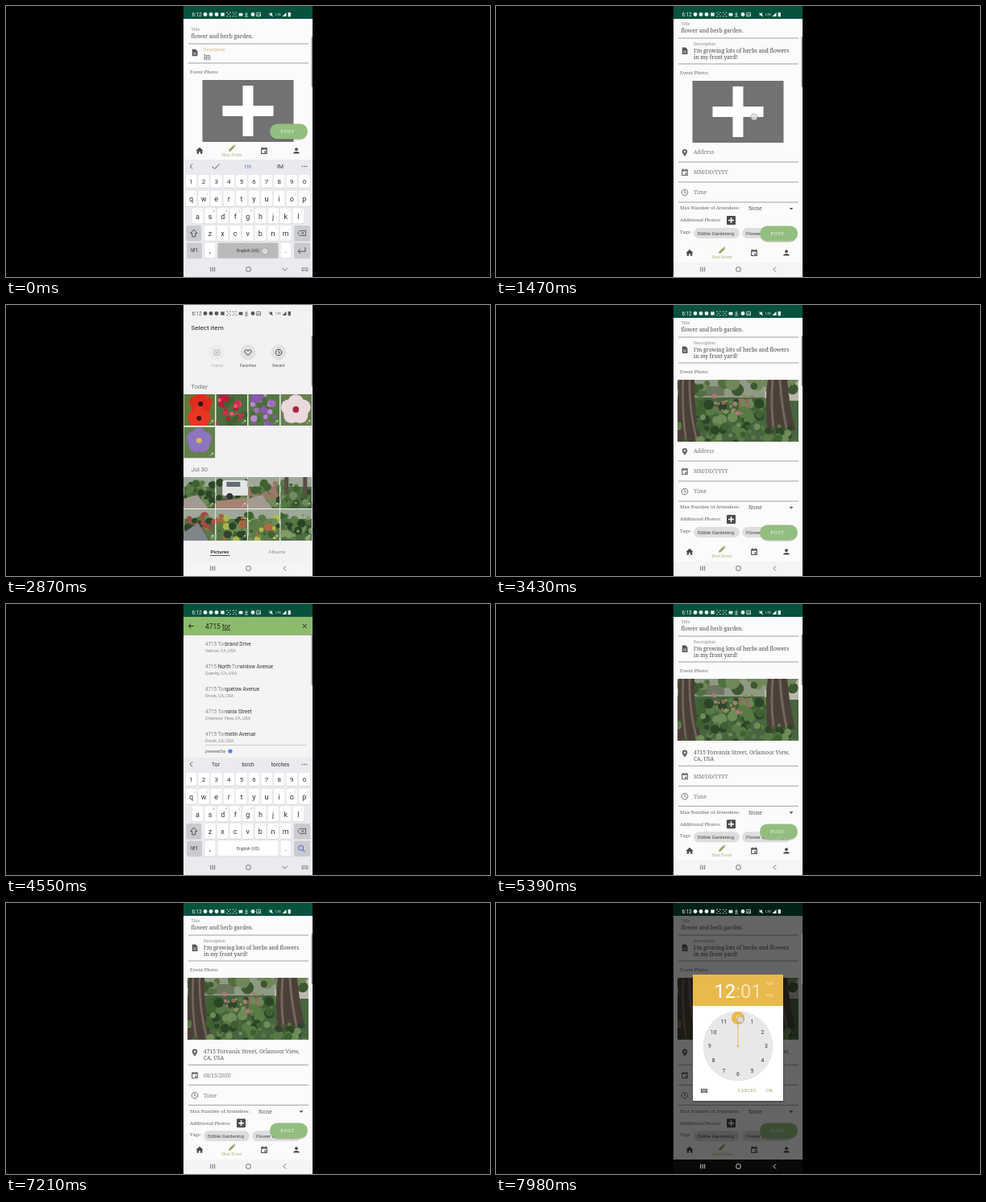
These frames come from a looping animation (600x337 px, 8000 ms). An HTML page:

```html
<!DOCTYPE html>
<html lang="en">
<head>
<meta charset="utf-8">
<title>Garden event form</title>
<style>
html, body { margin: 0; width: 100%; height: 100%; overflow: hidden; background: #000; }
svg { display: block; }
text { font-family: "Noto Serif", serif; white-space: pre; }
.r { font-family: Roboto, sans-serif; }
.m { text-anchor: middle; }
.b { font-weight: 500; }
.u { text-decoration: underline; }
</style>
</head>
<body>
<svg id="stage" width="100%" height="100%" viewBox="0 0 600 337"></svg>
<script>
const $ = id => document.getElementById(id);
const rect = (x, y, w, h, fill, r = 0, more = '') =>
  `<rect x="${x}" y="${y}" width="${w}" height="${h}" rx="${r}" fill="${fill}" ${more}/>`;
const disc = (x, y, r, fill, more = '') => `<circle cx="${x}" cy="${y}" r="${r}" fill="${fill}" ${more}/>`;
const path = (d, stroke, w = 0.9, fill = 'none') =>
  `<path d="${d}" stroke="${stroke}" stroke-width="${w}" fill="${fill}"/>`;
const shape = (d, fill) => `<path d="${d}" fill="${fill}"/>`;
// y is the optical middle of the line
const text = (x, y, size, str, fill = '#666', cls = '', more = '') =>
  `<text x="${x}" y="${y + size * 0.34}" font-size="${size}" fill="${fill}" class="${cls}" ${more}>${str}</text>`;
const group = (id, inner, more = '') => `<g id="${id}" ${more}>${inner}</g>`;
const at = (x, y, inner) => `<g transform="translate(${x} ${y})">${inner}</g>`;
const pic = (x, y, w, h, inner) =>
  `<svg x="${x}" y="${y}" width="${w}" height="${h}" viewBox="0 0 ${w} ${h}" preserveAspectRatio="none">${inner}</svg>`;
const line = (y, x = 226, x2 = 375) => path(`M${x} ${y}H${x2}`, '#8a8a8a', 0.8);

function seeded(s) {
  return () => (s = (s * 16807) % 2147483647) / 2147483647;
}

function blobs(seed, n, x, y, w, h, size, colors) {
  const rnd = seeded(seed * 7919);
  let out = '';
  for (let i = 0; i < n; i++) {
    out += disc((x + rnd() * w).toFixed(1), (y + rnd() * h).toFixed(1),
      (size * (0.5 + rnd())).toFixed(1), colors[Math.floor(rnd() * colors.length)]);
  }
  return out;
}

const leaf = ['#3f6132', '#587a45', '#2c4527', '#6d8c58'];

// icons, drawn around their centre
const home = c => shape('M0 -4.3L4.6 0H3.3V3.7H1V1H-1V3.7H-3.3V0H-4.6Z', c);
const pencil = c => shape('M-3.7 3.7V1.8L1.6 -3.5L3.5 -1.6L-1.8 3.7ZM2.1 -4L2.9 -4.7L4.7 -2.9L4 -2.1Z', c);
const calendar = c => path('M-3.3 -3H3.3V3.5H-3.3ZM-2 -4.4V-2.5M2 -4.4V-2.5M-3.3 -2H3.3', c, 1.1) + rect(0.3, 0.5, 2, 2, c);
const person = c => disc(0, -1.8, 1.9, c) + shape('M-3.7 3.5V2.4Q-3 1 0 0.9Q3 1 3.7 2.4V3.5Z', c);
const pin = c => `<path fill-rule="evenodd" fill="${c}" d="M0 4.5Q-3.2 .7 -3.2 -1.4A3.2 3.2 0 0 1 3.2 -1.4Q3.2 .7 0 4.5ZM0 -2.6A1.2 1.2 0 0 0 0 -.2A1.2 1.2 0 0 0 0 -2.6Z"/>`;
const clock = c => path('M0 -3.8A3.8 3.8 0 1 1 -.01 -3.8ZM0 -2.3V.2L1.8 1.3', c, 0.9);
const doc = c => shape('M-3.2 -4.2H1L3.4 -1.8V4.2H-3.2Z', c) + path('M-1.8 .3H1.8M-1.8 2.2H1.8', '#fff', 0.7);
const keypad = c => rect(-4, -2.6, 8, 5.2, c, 0.7) + path('M-3 -1.1H3M-3 .3H3', '#eee', 0.7, 'none') + path('M-1.6 1.7H1.6', '#eee', 0.7);

function photo() {
  const bark = ['#4b4038', '#75675c', '#5b4d44'];
  return pic(225, 93, 150, 77,
    rect(0, 0, 150, 77, '#486440') + rect(0, 0, 150, 22, '#8f9a85') + rect(108, 2, 42, 24, '#b9b8ac')
    + rect(28, 8, 30, 12, '#6d7560') + blobs(3, 26, 0, 0, 150, 14, 6, ['#52703f', '#70875a', '#3d5733'])
    + rect(101, 27, 10, 8, '#d4d3ce') + blobs(4, 80, 20, 24, 100, 50, 5, leaf)
    + blobs(9, 24, 40, 16, 54, 26, 2, ['#a77a78', '#936862', '#7f965f'])
    + shape('M2 0H21Q20 40 30 77H0V30Z', bark[0]) + path('M7 0Q5 40 11 77M15 0Q14 38 24 75', bark[1], 2.5)
    + shape('M112 0H136Q139 35 146 62L112 68Q108 25 112 0Z', bark[0])
    + path('M118 0Q115 35 120 66M127 0Q129 34 136 64', bark[1], 3)
    + blobs(13, 38, 0, 56, 150, 22, 4, leaf));
}

function form() {
  const ico = '#666';
  const chip = (x, w, s) => rect(x, 276, w, 13, '#dedede', 6.5) + text(x + 5, 282.5, 6, s, '#444', 'r');
  const plus = group('plus', rect(243.5, 93, 113, 77, '#727275') + rect(293.5, 100, 13, 63, '#fff') + rect(268.5, 125, 63, 13, '#fff'));
  const lower = group('lower',
    at(234, 207, calendar(ico)) + text(245, 207, 6.67, 'MM/DD/YYYY', '#777', '', 'id="dateText"') + line(219)
    + at(234, 232, clock(ico)) + text(245, 232, 6.67, 'Time', '#777') + line(244)
    + text(228, 251.5, 5.8, 'Max Number of Attendees:') + text(313, 252, 6.67, 'None', '#555') + shape('M363.5 251H368.5L366 253.6Z', '#555')
    + text(228, 266.5, 5.8, 'Additional Photos:') + rect(286, 261, 11, 11, '#4c4c4c', 1) + path('M291.5 263V270M288 266.5H295', '#fff', 1.5)
    + text(228, 281, 5.8, 'Tags:') + chip(245, 57, 'Edible Gardening') + chip(305, 60, 'Flower Gardening'));
  const middle = group('middle', text(228, 83, 5.9, 'Event Photo:') + plus + group('shot', photo())
    + at(234, 182.5, group('pin', pin(ico))) + text(245, 182, 6.67, 'Address', '#777', '', 'id="addr1"')
    + text(245, 193, 6.67, '', '#555', '', 'id="addr2"') + group('addrLine', line(194)) + lower);
  const content = group('content',
    text(229.5, 22.5, 5, 'Title', '#888') + text(229.5, 30.5, 6.67, 'flower and herb garden.', '#4c4c4c') + line(40)
    + at(234, 51, group('docIcon', doc('#555'))) + text(245, 47, 4.95, 'Description', '#888', '', 'id="descLabel"')
    + text(245, 55.5, 6.67, '', '#444', '', 'id="desc1"') + text(245, 63.5, 6.67, '', '#444', '', 'id="desc2"')
    + group('descLine', line(72)) + middle);
  const tabs = group('tabs', rect(220, 297, 160, 60, '#fbfbfb')
    + at(240, 307, home('#4b4b4b')) + at(280, 304, pencil('#94a46c')) + text(280, 312.5, 4.9, 'Host Event', '#9db56f', 'm')
    + at(320, 307, calendar('#4b4b4b')) + at(360, 307, person('#4b4b4b'))
    + rect(327.5, 275, 46, 19, '#000', 9.5, 'opacity=".16"') + rect(327, 273.5, 47, 19, '#93be7f', 9.5)
    + text(349, 283, 6, 'POST', '#f3f8ef', 'm', 'letter-spacing=".6"'));
  return rect(220, 0, 160, 337, '#fbfbfb') + content + rect(220, 0, 160, 16, '#07523f') + tabs;
}

function gallery() {
  const thumb = (col, y, bg, inner) => pic(220.3 + col * 40, y, 39, 39, rect(0, 0, 39, 39, bg) + inner
    + path('M32.5 36.5L36.5 32.5M34.5 32.5H36.5V34.5', '#eee', 0.7));
  const petals = (x, y, r, c, core) => [0, 1, 2, 3, 4].map(i =>
    disc(x + Math.sin(i * 1.257) * r * 0.7, y - Math.cos(i * 1.257) * r * 0.7, r * 0.75, c)).join('') + disc(x, y, r * 0.3, core);
  const garden = (seed, extra = [], tail = '') => rect(0, 0, 39, 12, '#9ea899')
    + blobs(seed, 34, 0, 7, 39, 32, 3.6, leaf.concat(extra)) + tail;
  const round = (x, label, icon, o) => `<g opacity="${o}">` + disc(x, 59, 9.7, '#e2e2e5')
    + at(x, 59, icon) + text(x, 75, 5, label, '#555', 'r m') + '</g>';
  const path1 = shape('M0 39V27L17 22L30 39Z', '#a39b91');
  const thumbs = group('thumbs',
    thumb(0, 111, '#5f7a3b', petals(21, 12, 10, '#df2b1d', '#30151a') + petals(19, 30, 10, '#e93522', '#3a1719'))
    + thumb(1, 111, '#4c6d3d', blobs(21, 26, 0, 0, 39, 39, 3.6, ['#d62b4f', '#b91c3c', '#e85573', '#3f6132']))
    + thumb(2, 111, '#557843', blobs(22, 34, 5, 0, 28, 39, 3, ['#a06ec0', '#8a58ad', '#b98ad0', '#486d3b']))
    + thumb(3, 111, '#68804f', petals(19, 19, 13, '#ead9dc', '#a9243f'))
    + thumb(0, 151.5, '#64804c', petals(19, 17, 11, '#8d75c0', '#e2ba4e'))
    + thumb(0, 214, '#48653f', garden(31, [], path1))
    + thumb(1, 214, '#6d765f', garden(32) + rect(8, 4, 31, 19, '#e4e5e6', 2) + rect(13, 6, 17, 6, '#646d73') + disc(17, 24, 4, '#333') + shape('M0 39V30L39 26V39Z', '#a68375'))
    + thumb(2, 214, '#516a46', garden(33, ['#997868'], path1))
    + thumb(3, 214, '#506a48', garden(34) + rect(5, 0, 5, 21, '#5a4c43') + rect(28, 0, 5, 21, '#5a4c43'))
    + thumb(0, 254, '#596a47', garden(35, ['#a64a45']) + shape('M0 39V29L18 17L31 39Z', '#80858a'))
    + thumb(1, 254, '#58764a', garden(36, ['#a86643', '#a6b849']))
    + thumb(2, 254, '#5b7b48', garden(37, ['#aa6b47', '#b1bb4e']))
    + thumb(3, 254, '#4d6c43', garden(38, ['#7f9b61'])));
  return rect(220, 0, 160, 337, '#f2f2f4') + text(229.5, 28, 8.1, 'Select item', '#222', 'r')
    + round(261.5, 'Videos', path('M-3 -3H3V3H-3Z', '#444', 0.8) + shape('M-1 -1.5L1.6 0L-1 1.5Z', '#444'), 0.4)
    + round(300, 'Favorites', path('M0 3.4Q-6.5 -1 -2.7 -3.2Q-.8 -3.7 0 -1.7Q.8 -3.7 2.7 -3.2Q6.5 -1 0 3.4Z', '#333', 0.9), 1)
    + round(338, 'Recent', clock('#333'), 1)
    + text(229.5, 101.5, 7.6, 'Today', '#777', 'r') + text(229.5, 204, 7.6, 'Jul 30', '#777', 'r') + thumbs
    + rect(220, 295, 160, 42, '#f2f2f4') + text(265, 307, 6.2, 'Pictures', '#222', 'r m b') + path('M253 311.5H277.5', '#333', 0.8)
    + text(336, 307, 6.2, 'Albums', '#888', 'r m');
}

const street = '4715 Torvanix Street';
const places = [
  ['4715 Torbrand Drive', 'Velmar, CA, USA'],
  ['4715 North Torwinlow Avenue', 'Quenby, CA, USA'],
  ['4715 Torquelow Avenue', 'Drosk, CA, USA'],
  [street, 'Orlamoor View, CA, USA'],
  ['4715 Tormelin Avenue', 'Drosk, CA, USA']
];

function search() {
  const rows = places.map((p, i) => text(247, 49.5 + 28 * i, 6.3, '', '#333', 'r', `id="place${i}"`)
    + text(247, 58.5 + 28 * i, 5.3, '', '#888', 'r', `id="town${i}"`)).join('');
  return rect(220, 0, 160, 337, '#f4f4f4') + rect(220, 16, 160, 23, '#8dbb6c') + rect(220, 0, 160, 16, '#07523f')
    + path('M232.5 27.5H226.7M229.3 24.7L226.5 27.5L229.3 30.3', '#222', 1) + text(247, 28, 8.4, '', '#222', 'r', 'id="query"')
    + path('M367.7 25L372.7 30M372.7 25L367.7 30', '#222', 1)
    + group('results', rows + path('M247 175.5H373', '#bbb', 0.7) + text(247, 183, 4.9, 'powered by', '#555', 'r') + disc(278, 183, 2.6, '#4a83e8'));
}

const keyBox = {};
function keyboard() {
  let out = rect(220, 191, 160, 146, '#e9ebee');
  const key = (c, x, y, w, h, fill = '#fff') => {
    keyBox[c] = [x - w / 2, y - h / 2, w, h];
    return rect(x - w / 2, y - h / 2 + 0.7, w, h, '#cfd1d5', 2) + rect(x - w / 2, y - h / 2, w, h, fill, 2);
  };
  const rows = [['1234567890', 229.5, 218, 16, ''], ['qwertyuiop', 229.5, 239.5, 19, '+×÷=/_‹›[]'],
    ['asdfghjkl', 237.5, 261, 19, '!@#$%^~*('], ['zxcvbnm', 253, 282.5, 19, "-':;,?~"]];
  for (const [chars, x0, y, h, hints] of rows) {
    [...chars].forEach((c, i) => {
      const x = x0 + i * 15.6;
      out += key(c, x, y, 13.6, h) + text(x, y + (hints ? 0.8 : 0), hints ? 9 : 8, c, '#333', 'r m');
      if (hints) out += text(x + 4.3, y - 6, 3.4, hints[i], '#999', 'r m');
    });
  }
  const grey = '#c9cbcf';
  out += key('shift', 232.8, 282.5, 18.5, 19, grey) + path('M232.8 278L237 282.6H234.8V286.8H230.8V282.6H228.6Z', '#444')
    + key('back', 367, 282.5, 20, 19, grey) + path('M364.5 279.4H371.5V285.6H364.5L361.8 282.5ZM366.3 281L369.3 284M369.3 281L366.3 284', '#444', 0.8)
    + key('sym', 233.5, 304, 19, 19, grey) + text(233.5, 304, 6.8, '!#1', '#333', 'r m')
    + key(',', 253, 304, 13, 19) + text(253, 304, 9, ',', '#333', 'r m')
    + key(' ', 300, 304, 75, 19) + text(300, 304, 5.2, 'English (US)', '#444', 'r m')
    + key('.', 346.7, 304, 12.5, 19) + text(346.7, 304, 9, '.', '#333', 'r m')
    + key('enter', 367, 304, 20, 19, grey)
    + group('enterIcon', path('M371 300V305.2H362.3M365 302.2L362 305.2L365 308.2', '#444', 0.9))
    + group('findIcon', path('M365.5 300.3A3 3 0 1 1 365.49 300.3ZM367.7 305.5L370.5 308.2', '#6b6fd0', 1.2));
  keyBox['!'] = keyBox.sym;
  keyBox["'"] = keyBox.sym;
  out += path('M231.2 196.5L228 199.5L231.2 202.5', '#444') + path('M255.5 199.5L258.7 202.5L264.5 196.5', '#444').replace('<path', '<path id="tick"')
    + [260, 300, 340].map((x, i) => text(x, 199.8, 6.8, '', '#333', 'r m', `id="hint${i}"`)).join('')
    + [367.5, 370, 372.5].map(x => disc(x, 199.5, 0.7, '#444')).join('');
  return out + rect(0, 0, 0, 0, '#000', 2, 'id="press" opacity=".27"');
}

const gold = '#e8b94c';
const actions = y => text(311.5, y, 5.7, 'CANCEL', '#91a968', 'm', 'letter-spacing=".2"') + text(339, y, 5.7, 'OK', '#91a968', 'm', 'letter-spacing=".2"');

function dateDialog() {
  const col = i => 258.7 + 13.6 * i;
  let days = '';
  for (let d = 1; d <= 31; d++) {
    const n = d + 5;
    days += text(col(n % 7), 154 + 15.45 * Math.floor(n / 7), 5.4, d, '#333', 'r m', `id="day${d}"`);
  }
  return rect(243, 72, 114, 194, '#000', 2, 'opacity=".2"') + rect(244, 71, 112, 193, '#fff', 1) + rect(244, 71, 112, 36.5, gold, 1)
    + text(253, 81.5, 6, '2020', '#f6e3b4') + text(253, 93.5, 13, '', '#fff', '', 'id="pickedDay"')
    + text(300, 121.5, 6, 'August 2020', '#333', 'r m b')
    + path('M260 119L257.5 121.5L260 124M340 119L342.5 121.5L340 124', '#333', 1)
    + [...'SMTWTFS'].map((d, i) => text(col(i), 139, 5, d, '#888', 'r m')).join('')
    + disc(0, 0, 7.7, gold, 'id="dayDot"') + days + actions(252);
}

function timeDialog() {
  let face = disc(300, 178, 43.5, '#e8e8e8') + path('M300 178V143', gold, 1) + disc(300, 178, 1.4, gold) + disc(300, 143, 8, gold);
  for (let h = 1; h <= 12; h++) {
    const a = h * Math.PI / 6;
    face += text(300 + 35 * Math.sin(a), 178 - 35 * Math.cos(a), 6.8, h, h === 12 ? '#fff' : '#333', 'r m');
  }
  return rect(243, 90, 114, 158, '#000', 2, 'opacity=".2"') + rect(244, 89, 112, 157, '#fff', 1) + rect(244, 89, 112, 39, gold, 1)
    + text(270.5, 109.5, 23.8, '12<tspan fill="#f7e4b6">:01</tspan>', '#fff', 'r')
    + text(339, 100, 6.2, 'AM', '#f7e4b6', 'r m') + text(339, 115, 6.2, 'PM', '#f7e4b6', 'r m')
    + face + at(258, 233.5, keypad('#555')) + actions(233.5);
}

function status() {
  const c = 'currentColor';
  const scan = x => path(`M${x - 2.2} 9V8H${x - 1}M${x + 1} 8H${x + 2.2}V9M${x - 2.2} 12V13H${x - 1}M${x + 1} 13H${x + 2.2}V12M${x - 1} 10.5H${x + 1}`, c, 0.7);
  return text(230.5, 10.7, 6.3, '6:12', c, 'r', 'id="clockText"')
    + [247, 254, 261, 306].map(x => disc(x, 10.5, 2.4, c)).join('') + rect(266.3, 8.4, 4.4, 4.2, c)
    + scan(276) + scan(283.5) + rect(288.6, 8.8, 4.8, 3.8, c, 0.6) + path('M298 7.8V11.2M296.2 9.8L298 11.5L299.8 9.8M296 13H300', c, 0.8)
    + path('M310.7 8.3H315.5V12.8H310.7ZM311.2 12.3L312.7 10.2L313.7 11.3L314.5 10.5L315.3 12.3', c, 0.7)
    + shape('M326.5 9.6H328L330 8V13L328 11.4H326.5Z', c) + path('M326.5 8L331 13', c, 0.7)
    + text(337.5, 10.7, 4.2, 'LTE', c, 'r m') + shape('M342.5 13L347.5 8V13Z', c) + rect(349.7, 8, 3.2, 5.2, c, 0.5);
}

function navBar() {
  const c = 'currentColor';
  return rect(220, 319, 160, 18, '#f5f5f5', 0, 'id="navBg"')
    + path('M253.7 324.7V330.3M256.2 324.7V330.3M258.7 324.7V330.3', c, 0.9)
    + rect(297.8, 324.8, 5.4, 5.4, 'none', 1.6, `stroke="${c}" stroke-width=".9"`)
    + group('backIcon', path('M347 324.5L344 327.5L347 330.5', c))
    + group('downIcon', path('M342.5 326L345.7 329L348.9 326', c) + at(370.5, 327.5, keypad('#999')));
}

$('stage').innerHTML = rect(0, 0, 600, 337, '#000')
  + `<svg x="220" y="0" width="160" height="337" viewBox="220 0 160 337">`
  + form() + group('search', search()) + group('gallery', gallery()) + group('keys', keyboard())
  + rect(220, 0, 160, 337, '#000', 0, 'id="scrim"') + group('dateBox', dateDialog()) + group('timeBox', timeDialog())
  + rect(378.6, 38, 1.4, 63, '#8b8b8b', 0.7) + group('status', status()) + group('nav', navBar())
  + group('touch', disc(0, 0, 4.6, '#777', 'opacity=".5"') + disc(0, 0, 3.8, '#eee', 'opacity=".75"')) + '</svg>';

const set = (id, name, v) => $(id).setAttribute(name, v);
const show = (id, o) => { set(id, 'opacity', o); set(id, 'display', o > 0 ? 'inline' : 'none'); };
const shift = (id, y) => set(id, 'transform', `translate(0 ${y})`);
const ramp = (t, a, b) => { const p = Math.min(1, Math.max(0, (t - a) / (b - a))); return p * p * (3 - 2 * p); };
const span = (t, a, b, c, d) => ramp(t, a, b) - ramp(t, c, d);
const mix = (a, b, p) => `rgb(${a.map((v, i) => Math.round(v + (b[i] - v) * p))})`;
const underlined = s => s.replace(/\S+$/, w => `<tspan class="u">${w}</tspan>`);
const lastWord = s => s.split(' ').pop();

const story = "I'm growing lots of herbs and flowers in my front yard!";
const firstLine = 37;
const entry = '4715 torvan';
const taps = [[0, 60, 321, 305], [1400, 1540, 320, 138], [2930, 3070, 360, 233], [3570, 3700, 290, 182],
  [5170, 5280, 290, 51], [5860, 5960, 290, 214], [6300, 6440, 342, 187], [6900, 7000, 339, 252],
  [7480, 7570, 290, 239], [7850, 8000, 303, 145]];
const storyStep = 840 / (story.length - 4);
const storyTime = i => 70 + (i - 3) * storyStep;
const entryTime = i => i < 8 ? 4060 + 60 * i : 4690 + 140 * (i - 8);
const typedCount = (s, time, t) => [...s].filter((c, i) => time(i) <= t).length;

function pressedKey(t, nStory, nEntry) {
  if (t < 60) return ' ';
  if (t < 950 && nStory > 3 && t - storyTime(nStory - 1) < storyStep * 0.75) return story[nStory - 1].toLowerCase();
  if (nEntry && t - entryTime(nEntry - 1) < 40) return entry[nEntry - 1];
  return null;
}

function draw(t) {
  const nStory = t < 70 ? 0 : typedCount(story, storyTime, t);
  const nEntry = typedCount(entry, entryTime, t);
  const desc = nStory ? story.slice(0, nStory) : 'Im';
  const query = entry.slice(0, nEntry);
  const keys = t < 1500 ? 1 - ramp(t, 1000, 1140) : span(t, 3860, 4000, 5190, 5300);
  const writing = t < 1140;
  const wrapped = desc.length > firstLine;

  // form
  const tail = wrapped ? 0 : -8;
  shift('content', wrapped ? 0 : 7);
  shift('descLine', tail);
  shift('middle', tail);
  shift('docIcon', wrapped ? 4.7 : 0);
  const first = desc.slice(0, firstLine), second = desc.slice(firstLine + 1);
  $('desc1').innerHTML = writing && !wrapped ? underlined(first) : first;
  $('desc2').innerHTML = writing ? underlined(second) : second;
  set('descLabel', 'fill', writing ? '#cfb477' : '#888');
  const placed = t >= 5200;
  $('addr1').textContent = placed ? street + ', Orlamoor View,' : 'Address';
  $('addr2').textContent = placed ? 'CA, USA' : '';
  set('addr1', 'fill', placed ? '#555' : '#777');
  shift('addr1', placed ? 3 : 0);
  shift('pin', placed ? 3.7 : 0);
  shift('addrLine', placed ? 7.3 : 0);
  shift('lower', placed ? 7.3 : 0);
  $('dateText').textContent = t >= 6990 ? '08/15/2020' : 'MM/DD/YYYY';
  const chosen = t >= 3080;
  show('plus', chosen ? 0 : 1);
  show('shot', chosen ? 1 : 0);
  shift('tabs', t < 3000 ? -127 * keys : 0);

  // picture chooser
  const gal = span(t, 1680, 1820, 3080, 3250);
  show('gallery', gal);
  show('thumbs', ramp(t, 2030, 2170));

  // address search
  show('search', span(t, 3690, 3830, 5200, 5380));
  $('query').innerHTML = underlined(query);
  show('results', nEntry >= 4 ? 1 : 0);
  const turn = nEntry > 8 ? 3 : 0;
  const hit = Math.max(0, nEntry - 5);
  places.forEach((p, i) => {
    const [name, town] = places[(i + turn) % places.length];
    const from = name.indexOf('Tor');
    $('place' + i).innerHTML = `<tspan fill="#888">4715 </tspan>${name.slice(5, from)}`
      + `<tspan fill="#888">${name.slice(from, from + hit)}</tspan>${name.slice(from + hit)}`;
    $('town' + i).textContent = town;
  });

  // keyboard
  show('keys', keys > 0 ? 1 : 0);
  shift('keys', 146 * (1 - keys));
  show('enterIcon', writing ? 1 : 0);
  show('findIcon', writing ? 0 : 1);
  show('tick', nStory ? 0 : t < 70 ? 1 : 0);
  const word = lastWord(writing ? desc : query);
  const hints = t < 70 ? ['', "I'm", 'IM'] : nEntry === 8 ? ['Tor', 'torch', 'torches'] : ['', word, ''];
  hints.forEach((h, i) => { $('hint' + i).textContent = h; });
  set('hint1', 'fill', t < 70 ? '#7377cf' : '#333');
  const box = keyBox[pressedKey(t, nStory, nEntry)];
  show('press', box ? 0.27 : 0);
  if (box) ['x', 'y', 'width', 'height'].forEach((n, i) => set('press', n, box[i]));

  // dialogs
  const date = span(t, 5950, 6090, 6990, 7130);
  const time = ramp(t, 7580, 7720);
  const dim = Math.max(date, time);
  show('scrim', dim * 0.6);
  show('dateBox', date);
  show('timeBox', time);
  const picked = t >= 6300;
  $('pickedDay').textContent = picked ? 'Sat, Aug 15' : 'Sun, Aug 9';
  set('dayDot', 'cx', picked ? 340.3 : 258.7);
  set('dayDot', 'cy', 184.9);
  set('day9', 'fill', picked ? gold : '#fff');
  set('day15', 'fill', picked ? '#fff' : '#333');

  // system bars
  $('clockText').textContent = t >= 5180 ? '6:13' : '6:12';
  set('status', 'color', mix([240, 246, 243], [85, 85, 88], gal));
  const light = keys > 0.5 ? [233, 235, 238] : [245, 245, 245];
  set('navBg', 'fill', mix(light, [8, 8, 8], dim));
  set('nav', 'color', mix([95, 95, 95], [225, 225, 225], dim));
  show('backIcon', keys > 0.5 ? 0 : 1);
  show('downIcon', keys > 0.5 ? 1 : 0);

  // finger
  const tap = taps.find(([a, b]) => t >= a && t < b);
  const spot = tap ? tap.slice(2) : box && [box[0] + box[2] / 2, box[1] + box[3] / 2];
  show('touch', spot ? 1 : 0);
  if (spot) set('touch', 'transform', `translate(${spot})`);
}

const start = performance.now();
function tick() {
  draw((performance.now() - start) % 8000);
  requestAnimationFrame(tick);
}
tick();
</script>
</body>
</html>
```
